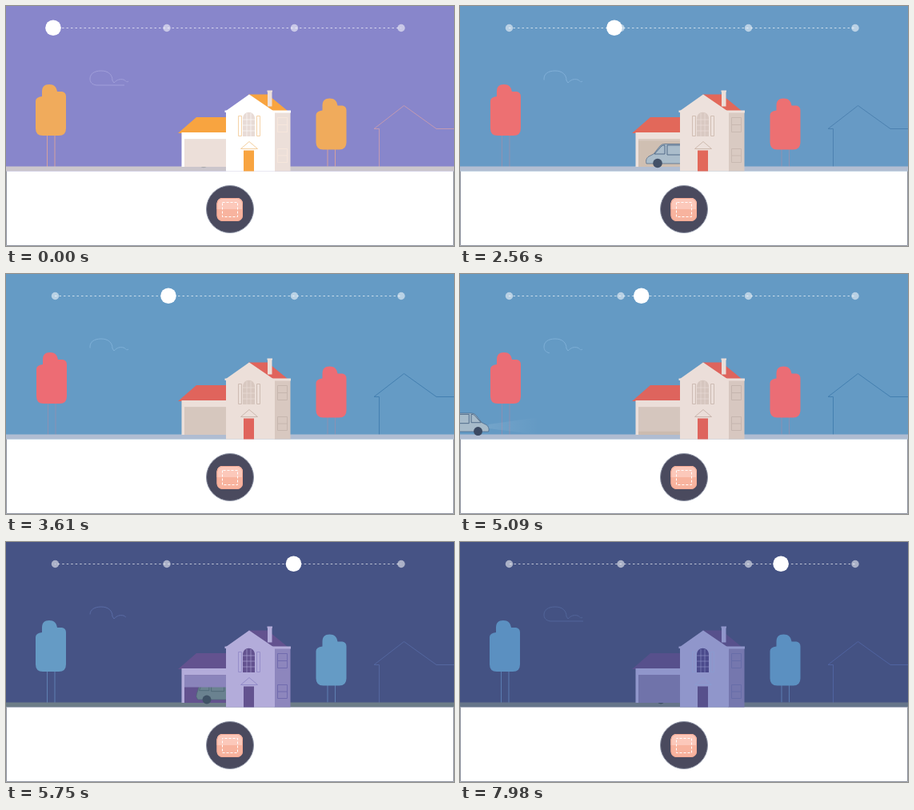
These frames come from a looping animation (560x300 px, 8000 ms). An HTML page with a canvas:

```html
<!DOCTYPE html>
<html lang="en">
<head>
<meta charset="utf-8">
<title>House through the day</title>
<style>
  html, body { margin: 0; width: 100%; height: 100%; overflow: hidden; background: #fff; }
  canvas { display: block; width: 560px; height: 300px; }
</style>
</head>
<body>
<canvas id="stage" width="560" height="300"></canvas>
<script>
const ctx = document.getElementById('stage').getContext('2d');
const LOOP = 8000;

// One colour per time of day; in-between moods are mixed.
const PALETTE = {
  sky:      ['#8886cb', '#659bc5', '#465385', '#445283'],
  ground:   ['#cbc6cc', '#b0bdd2', '#6d7d88', '#66758a'],
  tree:     ['#f0ab5c', '#ed6c74', '#659bc5', '#5b90c1'],
  trunk:    ['#d3a09f', '#8b90b2', '#5f80b3', '#5a7db2'],
  roof:     ['#f8a440', '#e0645c', '#63528f', '#57508c'],
  wall:     ['#ffffff', '#ecdfd9', '#b3acda', '#9096cb'],
  side:     ['#ecdfd9', '#d8c8c0', '#8d86bd', '#7577ae'],
  garage:   ['#ecdfd9', '#d6c7be', '#8a84bb', '#7073aa'],
  interior: ['#e6d8d0', '#cdbdb0', '#63528f', '#57508c'],
  glass:    ['#e8dbd6', '#d8c8c0', '#63528f', '#4b4a8c'],
  chimney:  ['#ecdfd9', '#ecdfd9', '#b3acda', '#9096cb'],
  trim:     ['#f4cf9f', '#cbb8af', '#938bc8', '#8b9bd0'],
  sideTrim: ['#f6e6dc', '#c6b6ae', '#716bae', '#676da8'],
  far:      ['#c39ab2', '#437fb0', '#5467a0', '#5063a0'],
  cloud:    ['#a19fda', '#80b1d8', '#5a6ca6', '#52659a'],
  body:     ['#d0d0d2', '#a8bccb', '#6a8290', '#6a8290'],
  line:     ['#a0a0a8', '#435f80', '#4c6675', '#4c6675'],
  wheel:    ['#a9a9ad', '#3b4a63', '#3f5266', '#3f5266']
};

const ramp = (t, from, to) => Math.min(1, Math.max(0, (t - from) / (to - from)));
const smooth = u => u * u * (3 - 2 * u);
const out = (u, n) => 1 - (1 - u) ** n;
const mix = (a, b, u) => a + (b - a) * u;

function mixStops(stops, s) {
  const i = Math.min(stops.length - 2, Math.floor(s));
  return mix(stops[i], stops[i + 1], s - i);
}

function mixColor(stops, s) {
  const channel = k => stops.map(hex => parseInt(hex.substr(k, 2), 16));
  return `rgb(${[1, 3, 5].map(k => Math.round(mixStops(channel(k), s)))})`;
}

// Piecewise linear track of [time, value] pairs.
function track(t, keys) {
  let value = keys[0][1];
  for (let i = 1; i < keys.length; i++)
    if (t >= keys[i - 1][0]) value = mix(keys[i - 1][1], keys[i][1], ramp(t, keys[i - 1][0], keys[i][0]));
  return value;
}

function rect(x, y, w, h, fill) {
  ctx.fillStyle = fill;
  ctx.fillRect(x, y, w, h);
}

function shape(d, fill, stroke, width = 1) {
  const path = new Path2D(d);
  if (fill) { ctx.fillStyle = fill; ctx.fill(path); }
  if (stroke) { ctx.strokeStyle = stroke; ctx.lineWidth = width; ctx.stroke(path); }
}

function disc(x, y, r, fill, stroke) {
  ctx.beginPath();
  ctx.arc(x, y, r, 0, 7);
  ctx.fillStyle = fill;
  ctx.fill();
  if (stroke) { ctx.strokeStyle = stroke; ctx.lineWidth = 1; ctx.stroke(); }
}

function at(x, y, scaleX, scaleY, draw) {
  ctx.save();
  ctx.translate(x, y);
  ctx.scale(scaleX, scaleY);
  draw();
  ctx.restore();
}

function drawTree(x, y, trunkEnd, c) {
  at(x, y, 1, 1, () => {
    shape(`M51.5 160V${trunkEnd}M61 160V${trunkEnd}`, null, c.trunk);
    shape('M45 107C45 101 48 98 54 98S63 101 64 107H70Q75 108 75 113V153Q75 162 66 162H46Q37 162 37 153V119Q37 114 45 113Z', c.tree);
  });
}

function drawCloud(t, c) {
  const start = track(t, [[2110, 20], [2230, 34], [2500, 66], [5070, 66], [5210, 0], [5450, 0], [5750, 68], [7900, 68], [7980, 14]]);
  const end = track(t, [[2110, 165], [2230, 132], [2600, 165], [5210, 165], [5600, 128], [7900, 128], [7980, 150]]);
  ctx.setLineDash([Math.max(1, end - start), 400]);
  ctx.lineDashOffset = -start;
  shape('M168 99H113C107 98 105 95 105 91C105 85 110 81 119 81C128 81 133 86 133 93L135 96C139 92 142 91 147 92C151 94 150 96 153 94', null, c.cloud);
  ctx.setLineDash([]);
}

function drawCar(c) {
  shape('M1 25C0 21 1 18 4 16L10 13L18 3Q20 .5 24 .5H55Q58 .5 59 3L62 13Q64 18 64 21L62 25Z', c.body, c.line, .7);
  shape('M11 13L20 3Q21 2 24 2V13ZM27 2H44V14H27ZM47 2H56L60 13H47Z', null, c.line, .9);
  disc(15, 24.5, 5.8, c.wheel);
  disc(50, 25, 5.8, c.wheel);
}

function drawGarage(t, c) {
  shape('M215 159L238 139H276V159Z', c.roof);
  rect(219.5, 158, 56, 43, c.wall);
  rect(223, 166.5, 53, 34.5, c.interior);

  const leaving = t < 4000;
  const carX = leaving
    ? 232 - 302 * ramp(t, 2560, 3410) ** 2
    : mix(-70, 238, out(ramp(t, 5070, 5720), 5));
  if (leaving) at(carX, 172, 1, 1, () => drawCar(c));
  else at(carX + 60, 173.5, -.94, .94, () => drawCar(c));

  const lift = leaving
    ? smooth(ramp(t, 2120, 2560)) - smooth(ramp(t, 3180, 3610))
    : ramp(t, 5075, 5200) - out(ramp(t, 5550, 6440), 2);
  rect(223, 166.5, 53, mix(34.5, 2, lift), c.garage);

  const glow = leaving ? 0 : ramp(t, 5080, 5150) * (1 - ramp(t, 5300, 5600));
  if (glow > 0) {
    const beam = ctx.createLinearGradient(carX + 59, 0, carX + 122, 0);
    beam.addColorStop(0, `rgba(255,255,255,${.6 * glow})`);
    beam.addColorStop(1, 'rgba(255,255,255,0)');
    at(carX, 0, 1, 1, () => {
      ctx.translate(-carX, 0);
      shape(`M${carX + 59} 188L${carX + 122} 179V201L${carX + 59} 193Z`, beam);
    });
  }
}

function drawHouse(c) {
  shape('M303 110.5H327L352 131H330Z', c.roof);
  rect(335, 131, 20.5, 75.5, c.side);
  shape('M275 206.5V131L304 110.5L334 131H336V206.5Z', c.wall);
  rect(273.5, 130.5, 6, 2.5, c.wall);
  rect(330, 130.5, 26, 3, c.wall);
  rect(327, 106, 5.5, 19.5, c.chimney);
  rect(326.5, 105.5, 6.5, 2, c.chimney);

  shape('M296 163V141C296 130 311 130 311 141V163Z', c.glass);
  shape('M301 134V163M306 134V163M296 142H311M296 149H311M296 156H311', null, c.wall, .6);
  shape('M290.5 137.5H294.5V162.5H290.5ZM313.5 137.5H317.5V162.5H313.5Z', null, c.trim, .9);
  shape('M293.5 178.5L304 169.5L314.5 178.5Z', null, c.trim);
  rect(297, 180.5, 13, 26, c.roof);
  shape('M339.5 139.5H351.5V157.5H339.5ZM339.5 148.5H351.5M339.5 178.5H351.5V195.5H339.5ZM339.5 187H351.5', null, c.sideTrim);
}

function drawTimeline(x) {
  ctx.setLineDash([2.5, 3]);
  shape('M61 27.5H494', null, 'rgba(255,255,255,.65)');
  ctx.setLineDash([]);
  for (const stop of [61.5, 201, 360.5, 494]) disc(stop, 27.5, 4.7, x < 61 && stop < 62 ? '#fff' : 'rgb(255,255,255,.55)');
  disc(x, 27.3, 9.8, '#fff');
}

function drawBadge() {
  rect(0, 206.5, 560, 93.5, '#fff');
  shape('M.5 206.5V299.5H559.5V206.5', null, '#8f94a0');
  disc(280, 254, 29.5, '#4a4a5e', '#8a90a2');
  ctx.save();
  ctx.beginPath();
  ctx.roundRect(263.5, 240, 32.5, 29, 7);
  ctx.clip();
  rect(263, 240, 34, 29, '#f8b39e');
  rect(263, 240, 34, 14, '#fcc8ba');
  ctx.restore();
  ctx.beginPath();
  ctx.roundRect(264, 240.5, 31.5, 28, 7);
  ctx.strokeStyle = '#f4a994';
  ctx.lineWidth = 1;
  ctx.stroke();
  ctx.setLineDash([3, 2]);
  shape('M270.5 245.5H289.5V263.5H270.5Z', null, '#fff');
  ctx.setLineDash([]);
}

function draw(t) {
  const toDay = smooth(ramp(t, 2100, 2650));
  const mood = toDay + smooth(ramp(t, 5070, 5340)) + ramp(t, 7905, 7980);
  const slider = 59 + 144 * toDay
    + 156.5 * out(ramp(t, 5070, 5720), 5)
    + 134 * smooth(ramp(t, 7905, 8110));

  const c = {};
  for (const key in PALETTE) c[key] = mixColor(PALETTE[key], mood);

  rect(0, 0, 560, 300, c.sky);
  drawTimeline(slider);
  drawCloud(t, c);
  shape('M466.5 201V153.5H460L497.5 124.5L538 153.5H560', null, c.far);
  drawTree(mixStops([0, 1, 0, 0], mood), 0, 201, c);
  drawTree(350.5, 17.5, 183, c);
  rect(0, 200.5, 560, 6, c.ground);
  drawGarage(t, c);
  drawBadge();
  drawHouse(c);
}

function frame() {
  draw(performance.now() % LOOP);
  requestAnimationFrame(frame);
}
frame();
</script>
</body>
</html>
```
